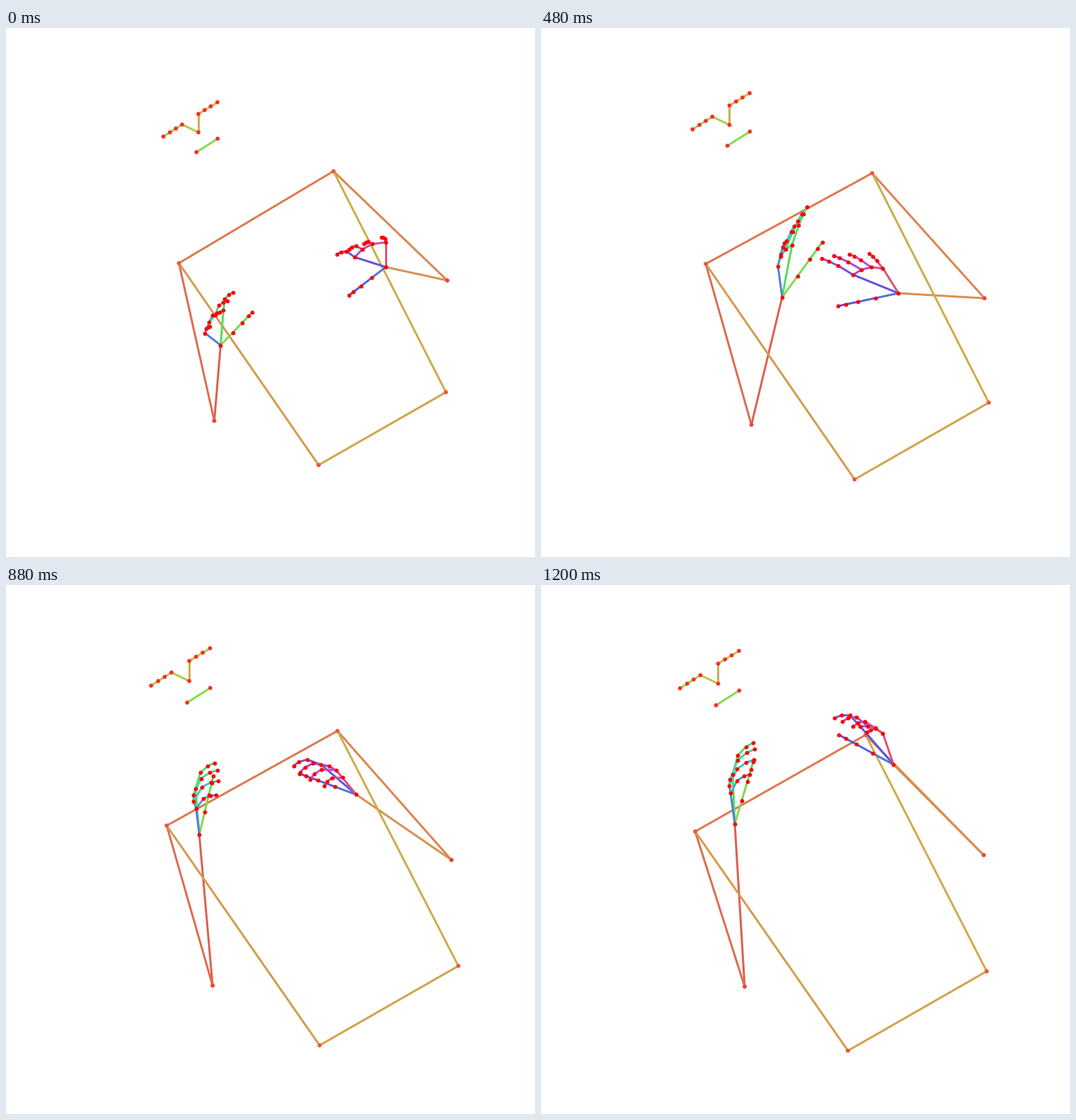
Animation of 748x748 px, one loop 1.28 s. Source, as a matplotlib script:

```python
import colorsys
import math

import matplotlib.pyplot as plt
import numpy as np
from matplotlib.animation import FuncAnimation
from matplotlib.collections import LineCollection

SIZE, DPI = 748, 100
FRAMES, INTERVAL = 16, 80
PX = 72 / DPI


def path(*keys):
    """Smooth motion through a few (frame, value, ...) keys."""
    keys = np.array(keys, float)
    times, values = keys[:, 0], keys[:, 1:]
    slopes = np.gradient(values, times, axis=0)

    def at(frame):
        i = min(np.searchsorted(times, frame, side="right") - 1, len(times) - 2)
        span = times[i + 1] - times[i]
        t = (frame - times[i]) / span
        ease = t * t * (3 - 2 * t)
        return (values[i] * (1 - ease) + values[i + 1] * ease
                + span * t * (1 - t) * ((1 - t) * slopes[i] - t * slopes[i + 1]))

    return at


def zoom(frame):
    """The figure grows a little as it comes closer."""
    t = min(frame / 10.6, 1)
    return 1 + 0.09 * t * t * (3 - 2 * t)


# Torso and arms
l_shoulder = path((0, 244.5, 332.5), (4, 236.5, 338), (6, 233, 333.5),
                  (9, 231, 332.5), (12, 225, 344), (15, 218, 348.5))
r_shoulder = path((0, 463, 202.5), (4, 464, 206.5), (9, 473, 203.5),
                  (12, 466, 208), (15, 459, 212))
l_elbow = path((0, 294.5, 555.5), (4, 306, 564.5), (6, 297.5, 561),
               (9, 291, 556.5), (12, 292.5, 570.5), (15, 288, 568))
r_elbow = path((0, 624, 357), (2, 623, 358), (4, 624.5, 372.5),
               (9, 630.5, 389), (15, 626, 382))
l_hip = path((0, 442, 618), (2, 442, 621), (4, 441.5, 633),
             (9, 446, 642.5), (12, 441.5, 654.5), (15, 434, 658.5))
l_wrist = path((0, 303.5, 448.5), (2, 326, 465.5), (4, 339, 445.5), (6, 341, 380.5),
               (9, 326, 351), (12, 254, 353.5), (15, 274, 338))
r_wrist = path((0, 537, 338), (2, 537.5, 346.5), (4, 538.5, 373.5), (6, 505.5, 375),
               (9, 482, 371.5), (12, 502, 264), (15, 498.5, 254))
nose = path((0, 272, 147.5), (2, 270, 147), (4, 267.5, 142), (6, 266.5, 137),
            (9, 260.5, 138.5), (12, 258, 135), (15, 250.5, 139.5))

HIP_WIDTH = np.array([180, -103])
# Ends of each feature, measured from the nose
R_EYE = np.array([(0, -26), (27, -42.5)])
L_EYE = np.array([(-23, -11), (-49.5, 6)])
MOUTH = np.array([(-2.7, 28), (27.3, 9)])

# Hand shapes, measured from the wrist: thumb tip, index knuckle and tip,
# little finger knuckle and tip, then how far the fingers bend.
l_shape = path((0, 45, -47, 4, -50, 18, -75, -22, -17, -15, -27, 0.2),
               (2, 53, -39, 11, -46, 30, -61, -16, -11, -3, -15, 0.13),
               (4, 50, -58, 8, -60, 25, -91, -17, -25, -5, -38, 0.13),
               (6, 57, -78, 14, -74, 35, -128, -6, -44, 3, -77, 0.02),
               (9, 39, -85, 15, -70, 53, -114, 22, -45, 52, -72, 0.1),
               (12, 14, -82, -13, -63, 9, -98, -16, -34, 10, -51, 0.2),
               (15, 26, -88, -3, -70, 26, -115, -6, -44, 21, -70, 0.16))
r_shape = path((0, -52, 40, -44, -14, -69, -18, 0, -35, -6, -42, 0.25),
               (4, -66, 26, -51, -22, -80, -34, -6, -35, -16, -46, 0.14),
               (6, -85, 18, -64, -26, -108, -49, -22, -35, -41, -56, 0.03),
               (9, -89, 8, -65, -21, -110, -17, -32, -11, -60, -3, 0.07),
               (12, -77, -45, -44, -52, -80, -54, -14, -32, -38, -22, 0.26),
               (15, -77, -42, -47, -54, -83, -66, -15, -44, -37, -46, 0.27))


def normal(v):
    return np.array([v[1], -v[0]])


def between(ends, fractions):
    start, end = ends
    return [start + (end - start) * u for u in fractions]


def chain(points):
    return list(zip(points[:-1], points[1:]))


def body(frame):
    ls, rs, le, re, lw, rw, lh, tip = (joint(frame) for joint in (
        l_shoulder, r_shoulder, l_elbow, r_elbow, l_wrist, r_wrist, l_hip, nose))
    scale = zoom(frame)
    rh = lh + HIP_WIDTH * scale
    right, left = (between(tip + eye * scale, (0, 0.33, 0.65, 1)) for eye in (R_EYE, L_EYE))
    lips = list(tip + MOUTH * scale)
    lines = (chain([lw, le, ls, rs, re, rw]) + chain([ls, lh, rh, rs])
             + chain([tip] + right) + chain([tip] + left) + chain(lips))
    return lines, [ls, rs, lh, rh, le, re, tip] + right + left + lips


def finger(knuckle, tip, bend):
    """Four joints along a parabola."""
    reach = tip - knuckle
    return [knuckle + reach * u + 4 * u * (1 - u) * bend * normal(reach)
            for u in (0, 0.5, 0.8, 1)]


def hand(wrist, shape, side):
    thumb, *corners = wrist + shape[:10].reshape(5, 2)
    index, index_tip, little, little_tip = corners
    bend = side * shape[10]
    thumb_joints = between((wrist, thumb), (0.38, 0.68, 0.88, 1))
    lines = chain([wrist] + thumb_joints)
    dots = [wrist] + thumb_joints
    start = wrist
    for u in (0, 0.3, 0.63, 1):
        bulge = 4 * u * (1 - u)
        knuckle = index + (little - index) * u - side * 0.13 * bulge * normal(little - index)
        tip = index_tip + (little_tip - index_tip) * u
        joints = finger(knuckle, tip + 0.13 * bulge * (tip - knuckle), bend)
        lines += chain([start] + joints)
        dots += joints
        start = knuckle
    return lines + [(start, wrist)], dots


def hands(frame):
    left = hand(l_wrist(frame), l_shape(frame), 1)
    right = hand(r_wrist(frame), r_shape(frame), -1)
    return left[0] + right[0], left[1] + right[1]


def rainbow(hues):
    """Soft hues, slightly darker at yellow, cyan and magenta."""
    def shade(hue):
        dip = (0.5 - 0.5 * math.cos(math.radians(3 * hue))) ** 2
        return colorsys.hsv_to_rgb(hue / 360, 0.63, 0.87 - 0.09 * dip)
    return [shade(hue) for hue in hues]


ARM_AND_TORSO_HUES = np.linspace(6, 45, 8)
FACE_HUES = np.linspace(47, 99, 9)
BODY_HUES = [*ARM_AND_TORSO_HUES, *FACE_HUES]
HAND_HUES = 99 + 6 * np.arange(42)
BODY_DOTS = ["#f3523a"] * 4 + ["#f63e30"] * 2 + ["#f92e24"] * 11

fig = plt.figure(figsize=(SIZE / DPI, SIZE / DPI), dpi=DPI, facecolor="white")
ax = fig.add_axes([0, 0, 1, 1])
ax.set(xlim=(0, SIZE), ylim=(SIZE, 0))
ax.axis("off")


def add_layer(pose, hues, dot_colors, z):
    lines, dots = pose(0)
    limbs = LineCollection(lines, colors=rainbow(hues), linewidths=3 * PX,
                           capstyle="round", zorder=z)
    ax.add_collection(limbs, autolim=False)
    marks = ax.scatter(*np.transpose(dots), s=(5.8 * PX) ** 2, c=dot_colors,
                       linewidths=0, zorder=z + 1)
    return pose, limbs, marks


layers = [add_layer(body, BODY_HUES, BODY_DOTS, 1),
          add_layer(hands, HAND_HUES, "#ff0000", 3)]


def draw(frame):
    for pose, limbs, marks in layers:
        lines, dots = pose(frame)
        limbs.set_segments(lines)
        marks.set_offsets(dots)
    return [artist for layer in layers for artist in layer[1:]]


anim = FuncAnimation(fig, draw, frames=FRAMES, interval=INTERVAL,
                     repeat=True, repeat_delay=0, blit=False)
plt.show()
```
